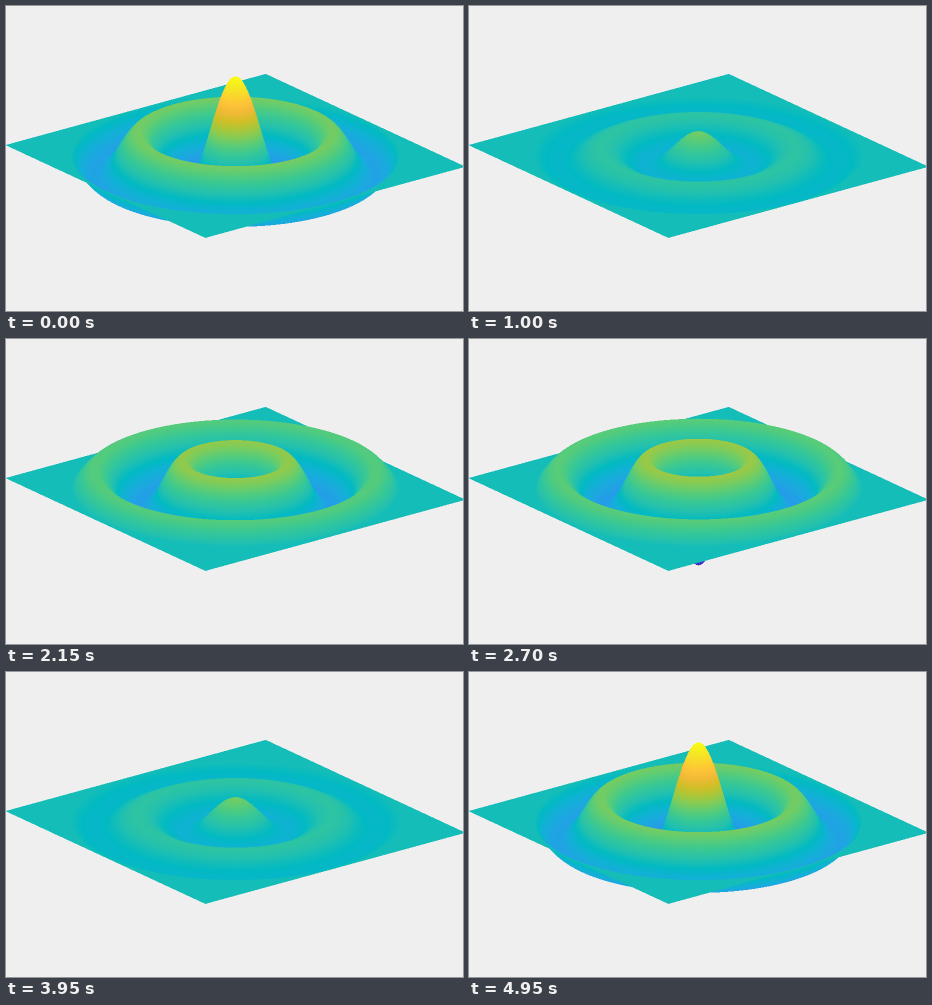
Animation of 457 by 305 pixels, one loop 5 s. Source, as a matplotlib script:

```python
import numpy as np
import matplotlib.pyplot as plt
from matplotlib.animation import FuncAnimation
from matplotlib.colors import LinearSegmentedColormap, to_rgb

W, H = 457, 305
FRAMES, INTERVAL = 100, 50
DPI = 128
SS = 2                          # supersampling factor

# Orthographic view of a square plate, in stage pixels
CX, CY = 229.5, 149.9
HALF = 163.7                    # half the side of the plate, radius of the drum
TILT = 0.3563                   # vertical foreshortening
LIFT = 79                       # screen height of amplitude 1
TURN = np.radians(52.5)
FOURTH_ZERO = 11.7915           # fourth zero of the Bessel function J0

BACKGROUND = "#f0eff0"
PARULA = LinearSegmentedColormap.from_list("parula", [
    "#3e26a8", "#4332cb", "#4741e5", "#4852f4", "#4563fd", "#3875fe",
    "#2e87f7", "#2797eb", "#20a5e3", "#12b1d6", "#02bac3", "#24c1ae",
    "#37c897", "#57cc7a", "#81cc59", "#abc739", "#d1bf27", "#f0ba36",
    "#fec338", "#fad62d", "#f5e924", "#f9fb15"], N=256)


def bessel_j0(x):
    tau = (np.arange(200) + 0.5) * np.pi / 200
    return np.cos(np.outer(x, np.sin(tau))).mean(axis=1)


def sample_plate():
    """Points of the plate from back to front: column, flat row, mode height."""
    cols = np.arange(W * SS)
    u = (cols + 0.5) / SS - CX
    v = np.arange(-232, 232, 0.125)
    u, v = np.meshgrid(u, v)
    x = u * np.cos(TURN) + v * np.sin(TURN)
    y = v * np.cos(TURN) - u * np.sin(TURN)
    inside = np.maximum(abs(x), abs(y)) <= HALF
    col = np.broadcast_to(cols, u.shape)[inside]
    u, v = u[inside], v[inside]

    radius = np.linspace(0, HALF, 1500)
    profile = bessel_j0(radius / HALF * FOURTH_ZERO)
    mode = np.interp(np.hypot(u, v), radius, profile, right=0)
    row = (CY + TILT * v) * SS
    return col, row.astype(np.float32), mode.astype(np.float32)


COL, ROW, MODE = sample_plate()
ORDER = np.arange(len(COL), dtype=np.int32)


def render(amp):
    row = (ROW - np.float32(LIFT * SS * amp) * MODE).astype(np.int32)
    nearest = np.full(H * SS * W * SS, -1, dtype=np.int32)
    nearest[row * (W * SS) + COL] = ORDER      # nearer points overwrite
    hit = nearest >= 0
    img = np.empty((nearest.size, 3))
    img[:] = to_rgb(BACKGROUND)
    img[hit] = PARULA(0.5 + 0.5 * amp * MODE[nearest[hit]])[:, :3]
    return img.reshape(H, SS, W, SS, 3).mean(axis=(1, 3))


fig = plt.figure(figsize=(W / DPI, H / DPI), dpi=DPI, facecolor=BACKGROUND)
ax = fig.add_axes([0, 0, 1, 1])
ax.axis("off")
picture = ax.imshow(np.ones((H, W, 3)), interpolation="nearest", aspect="auto")
cache = {}


def update(n):
    # The swing back mirrors the swing out
    step = min(n, FRAMES - 1 - n)
    if step not in cache:
        cache[step] = render(np.cos(2 * np.pi * step / (FRAMES - 1)))
    picture.set_data(cache[step])
    return [picture]


anim = FuncAnimation(fig, update, frames=FRAMES, interval=INTERVAL,
                     repeat=True, repeat_delay=0)
plt.show()
```
